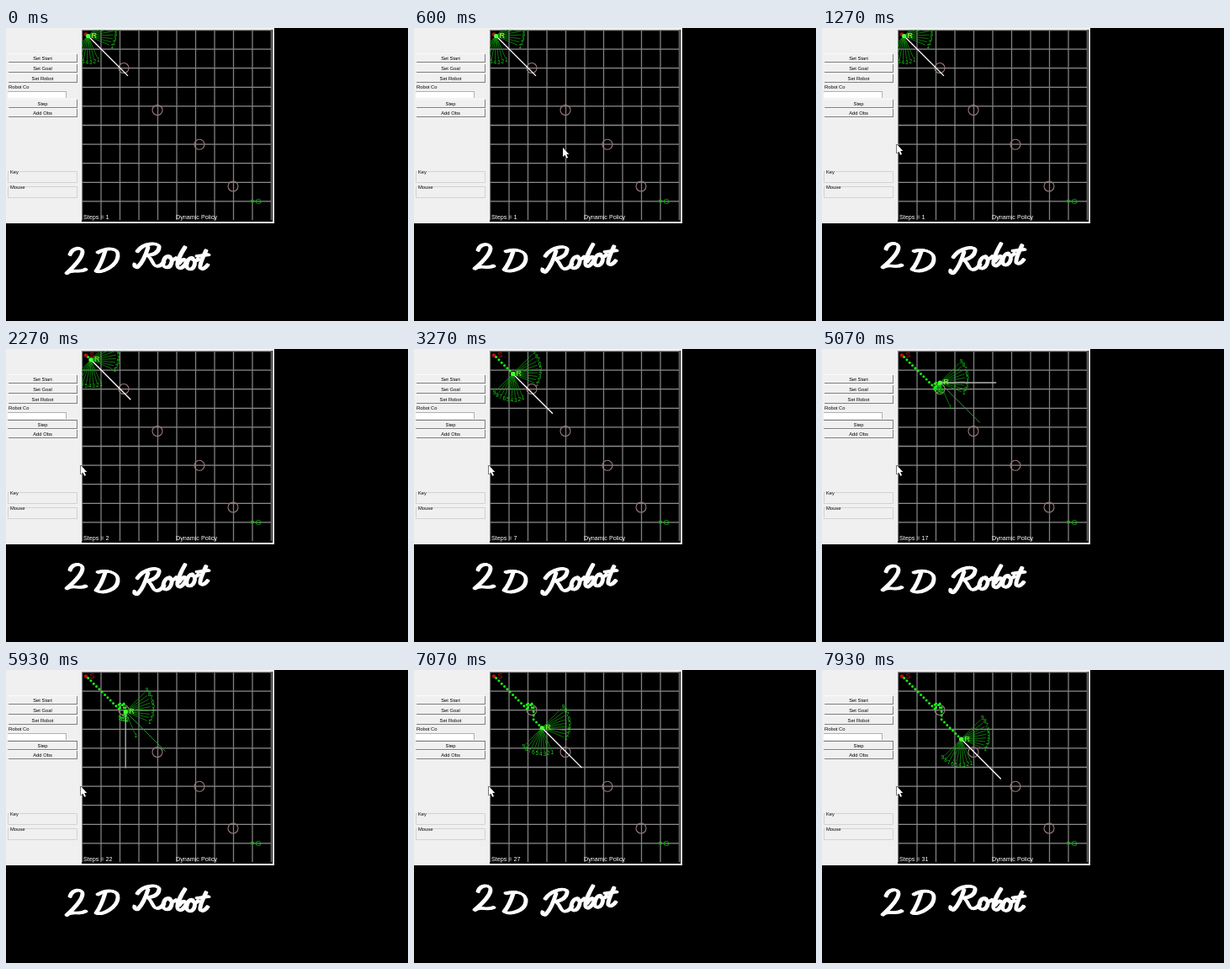
An HTML page with a canvas that plays this animation: 478 px wide and 348 px high, repeating every 8000 ms.

```html
<!DOCTYPE html>
<html lang="en">
<head>
<meta charset="utf-8">
<title>2 D Robot</title>
<style>
  html, body { margin: 0; width: 100%; height: 100%; overflow: hidden; background: #000; }
  canvas { display: block; }
</style>
</head>
<body>
<canvas id="stage" width="478" height="348" role="img" aria-label="2 D Robot path planner"></canvas>
<script>
const ctx = document.getElementById('stage').getContext('2d');
const LOOP = 8000;
const SANS = '"Liberation Sans", Arial, sans-serif';
const STEP_LENGTH = 4.7;
const SIGHT = 67;
const GOAL_TURN = 1;

// Headings in eighths of a turn, clockwise from east.
const turns = [
  ...Array(11).fill(1),
  -2, 0, 3, -2, 0, 2, 4, -1, 1, 2,
  2, 2, ...Array(7).fill(1)
];
const poses = [{ x: 97.6, y: 9.5, turn: 1 }];
for (const turn of turns) {
  const last = poses[poses.length - 1], angle = turn * Math.PI / 4;
  poses.push({
    x: last.x + STEP_LENGTH * Math.cos(angle),
    y: last.y + STEP_LENGTH * Math.sin(angle),
    turn
  });
}

// [time, step reached]
const pace = [[1950, 1], [3150, 7], [4150, 12], [5850, 22], [6930, 27], [7780, 31]];

function stepAt(t) {
  if (t < pace[0][0]) return 1;
  for (let i = 1; i < pace.length; i++) {
    const [t0, s0] = pace[i - 1], [t1, s1] = pace[i];
    if (t < t1) return Math.floor(s0 + (s1 - s0) * (t - t0) / (t1 - t0));
  }
  return 31;
}

function text(str, x, y, size, color, align = 'left') {
  ctx.font = `${size}px ${SANS}`;
  ctx.textAlign = align;
  ctx.fillStyle = color;
  ctx.fillText(str, x, y);
}

function rect(x, y, w, h, color) {
  ctx.fillStyle = color;
  ctx.fillRect(x, y, w, h);
}

function line(x0, y0, x1, y1, color, width = 1) {
  ctx.strokeStyle = color;
  ctx.lineWidth = width;
  ctx.beginPath();
  ctx.moveTo(x0, y0);
  ctx.lineTo(x1, y1);
  ctx.stroke();
}

function ray(from, angle, length, color, width) {
  line(from.x, from.y, from.x + length * Math.cos(angle), from.y + length * Math.sin(angle), color, width);
}

function dot(x, y, r, color) {
  ctx.fillStyle = color;
  ctx.beginPath();
  ctx.arc(x, y, r, 0, 7);
  ctx.fill();
}

function button(label, y, focused) {
  rect(2, y, 83, 11, focused ? '#777' : '#fafafa');
  rect(3, y + 1, 82, 10, '#808080');
  rect(2, y + 1, 82, 9, '#f0f0f0');
  text(label, 43.5, y + 7.7, 5.8, '#000', 'center');
}

function groupBox(label, y) {
  ctx.strokeStyle = '#d2d2d2';
  ctx.lineWidth = 1;
  ctx.strokeRect(2.5, y + 0.5, 82, 13);
  rect(4, y - 2, label.length * 3 + 3, 5, '#f0f0f0');
  text(label, 5, y + 2.5, 5.8, '#000');
}

function drawPanel(t) {
  rect(0, 0, 319, 232, '#f0f0f0');
  button('Set Start', 30);
  button('Set Goal', 42);
  button('Set Robot', 54);
  text('Robot Co', 3, 72, 5.8, '#000');
  rect(2, 75, 70, 8, '#b0b0b0');
  rect(2, 76, 69, 7, '#fff');
  button('Step', 84, t > 1670);
  button('Add Obs', 95);
  groupBox('Key', 170);
  groupBox('Mouse', 188);
}

function drawSensors(step, robot) {
  const avoiding = step > 12 && step < 23;
  for (const side of [-1, 1]) {
    for (let i = 0; i < 9; i++) {
      const degrees = 45 + side * (22 + i * 8.5);
      const angle = degrees * Math.PI / 180;
      const blocked = avoiding && degrees > 75;
      const reach = blocked ? 7 : 28 + (side < 0 ? i * 0.6 : 0);
      ray(robot, angle, reach, blocked ? '#18d818' : '#109410', 0.8);
      text(String(i + 1), robot.x + (reach + 3) * Math.cos(angle),
        robot.y + (reach + 3) * Math.sin(angle) + 2.3, 6.5, '#18d418', 'center');
    }
  }
}

function drawWorld(step) {
  const robot = poses[step - 1];
  ctx.save();
  ctx.beginPath();
  ctx.rect(90, 2, 227, 228);
  ctx.clip();
  rect(90, 2, 227, 228, '#000');
  for (let i = 0; i <= 10; i++) {
    const x = 90.5 + i * 22.5, y = 2.5 + i * 22.6;
    line(x, 2, x, 228, '#808080', 1.3);
    if (i < 10) line(90, y, 315, y, '#8c8c8c', 1.3);
  }
  for (const [x, y] of [[140, 47.5], [180, 97.5], [230, 138.3], [270, 188]]) {
    ctx.strokeStyle = '#9c7878';
    ctx.lineWidth = 1.1;
    ctx.beginPath();
    ctx.arc(x, y, 6, 0, 7);
    ctx.stroke();
  }
  dot(293, 205.5, 2, '#14b414');
  text('G', 296.5, 208.8, 9.5, '#18a818');

  drawSensors(step, robot);
  dot(95, 7.5, 2.3, '#b41010');
  if (step > 1) text('S', 99.5, 10, 8.5, '#c81414');
  for (const p of poses.slice(0, step)) dot(p.x, p.y, 1.5, '#18f018');
  const heading = robot.turn * Math.PI / 4;
  const onCourse = robot.turn === GOAL_TURN;
  if (!onCourse) ray(robot, GOAL_TURN * Math.PI / 4, SIGHT, '#2a9c3a', 1);
  ray(robot, heading, SIGHT, onCourse ? '#fff' : '#b4b4b4', 1.3);
  dot(robot.x, robot.y, 2.6, '#4cff38');
  text('R', robot.x + 4, robot.y + 2.5, 9, step === 1 ? '#d8ff28' : '#7cff30');

  text('Steps = ' + step, 92, 226.5, 7.2, '#fff');
  text('Dynamic Policy', 202, 226.5, 7.2, '#fff');
  ctx.restore();
}

// Brush lettering: [centre x, pen strokes]
const letters = [
  [83, 'M76 266C79 257 91 257 91 263C91 271 80 281 72 288C79 282 86 289 95 284'],
  [120, 'M118 265C115 275 111 283 107 288C116 291 132 284 133 273C134 263 121 261 109 266'],
  [168, 'M169 263C166 273 162 282 157 287C154 289 152 287 153 284M156 269C164 257 184 256 182 263C181 269 174 272 168 273C174 275 174 285 179 285C183 285 186 282 188 279'],
  [194, 'M195 271C187 271 184 285 190 285C197 285 200 272 194 272C196 276 200 275 203 272'],
  [208, 'M213 258C208 266 203 277 204 282C206 288 215 279 214 274C213 271 208 274 206 278'],
  [220, 'M222 270C215 270 212 284 218 284C225 284 227 271 221 271C223 275 226 274 229 271'],
  [235, 'M238 261C234 269 230 278 231 282C233 285 238 281 240 278M227 268L241 266']
].map(([x, d]) => [x, new Path2D(d)]);

function drawTitle(t) {
  const sway = 3.2 * Math.tanh(3 * Math.cos(2 * Math.PI * (t / 980 + 0.1)));
  const k = 2 * Math.PI / 160;
  ctx.strokeStyle = '#fff';
  ctx.lineWidth = 2.9;
  ctx.lineCap = ctx.lineJoin = 'round';
  for (const [x, path] of letters) {
    const phase = k * (x - 75);
    const slope = -sway * k * Math.sin(phase);
    for (const nib of [-1, 0, 1]) {
      ctx.save();
      ctx.transform(1, slope, 0, 1, nib, sway * Math.cos(phase) - slope * x + nib * 0.4);
      ctx.stroke(path);
      ctx.restore();
    }
  }
  ctx.lineCap = 'butt';
}

function drawCursor(t) {
  if (t < 70) return;
  const p = Math.min(1, (t - 70) / 800);
  ctx.save();
  ctx.translate(351 - 262 * p, 150 - 12 * p);
  const arrow = new Path2D('M0 0V11L2.4 8.8L4.2 12.8L6 12L4.2 8H7.2Z');
  ctx.strokeStyle = '#000';
  ctx.lineWidth = 1;
  ctx.stroke(arrow);
  ctx.fillStyle = '#fff';
  ctx.fill(arrow);
  ctx.restore();
}

function draw(now) {
  const t = (now - start) % LOOP;
  rect(0, 0, 478, 348, '#000');
  drawPanel(t);
  drawWorld(stepAt(t));
  drawTitle(t);
  drawCursor(t);
}

const start = performance.now();
function frame() {
  draw(performance.now());
  requestAnimationFrame(frame);
}
frame();
</script>
</body>
</html>
```
